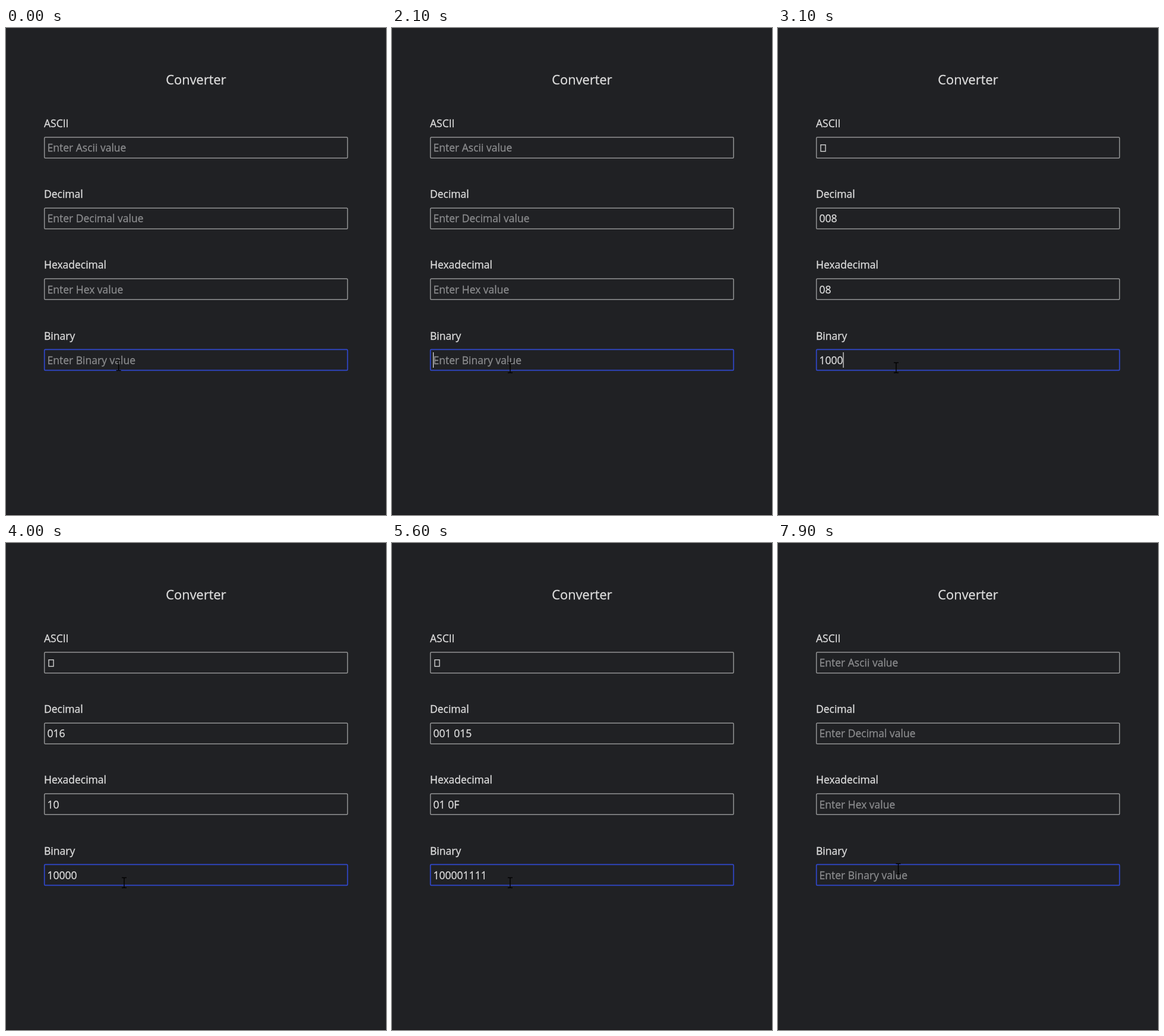
These frames come from a looping animation (640 by 820 pixels, 8000 ms). An HTML page:

```html
<!DOCTYPE html>
<html lang="en">
<head>
<meta charset="utf-8">
<title>Converter</title>
<style>
  html, body { margin: 0; width: 100%; height: 100%; overflow: hidden; background: #202124; }
  svg { display: block; width: 640px; height: 820px; }
  text {
    font: 17.5px "Open Sans", "Noto Sans CJK SC", "Noto Sans CJK JP", sans-serif;
    fill: #dedede; stroke: #dedede; stroke-width: 0.3; white-space: pre;
  }
  .title { font-size: 21.9px; text-anchor: middle; }
  .hint { fill: #8b8c8e; stroke: #8b8c8e; }
  .box { fill: none; stroke: #929394; stroke-width: 1.5; }
  .focus { stroke: #3048cc; stroke-width: 1.7; }
  .tofu { fill: none; stroke: #dedede; stroke-width: 1.3; }
  .mouse { fill: none; stroke: #000; stroke-width: 1.4; }
</style>
</head>
<body>
<svg id="stage" viewBox="0 0 640 820">
  <rect width="640" height="820" fill="#202124"/>
  <rect y="819" width="640" height="1" fill="#19171a"/>
  <text class="title" x="320" y="95">Converter</text>
</svg>
<script>
const LOOP = 8000;
const STEP = 119.1;
const TEXT_X = 69.6;
const DIGIT_W = 10.02;

// [time, binary input, caret visible]
const TYPING = [
  [0, "", 0], [500, "", 1], [1000, "", 0], [1100, "", 1], [2000, "", 0], [2100, "", 1],
  [2400, "1", 1], [2700, "10", 1], [2900, "100", 1], [3100, "1000", 1],
  [3500, "10000", 1], [4000, "10000", 0], [4400, "100001", 1], [4500, "1000011", 1],
  [4700, "10000111", 1], [5000, "100001111", 1], [5600, "100001111", 0],
  [6100, "100001111", 1], [6600, "100001111", 0], [7100, "100001111", 1],
  [7200, "", 1], [7900, "", 0]
];
// [time, x, y]
const MOUSE = [[0, 189.7, 568.2], [100, 199, 572], [7900, 202.6, 548.5]];

const stage = document.getElementById("stage");

function add(tag, attrs, content = "") {
  const el = document.createElementNS("http://www.w3.org/2000/svg", tag);
  for (const name in attrs) el.setAttribute(name, attrs[name]);
  el.textContent = content;
  return stage.appendChild(el);
}

const fields = [["ASCII", "Ascii"], ["Decimal", "Decimal"], ["Hexadecimal", "Hex"], ["Binary", "Binary"]]
  .map(([label, name], i) => {
    const y = i * STEP;
    add("text", { x: 64, y: 167.2 + y }, label);
    add("rect", {
      class: i === 3 ? "box focus" : "box",
      x: 64.7, y: 184.1 + y, width: 510.6, height: 35, rx: 1.5
    });
    return { el: add("text", { x: TEXT_X, y: 208.3 + y }), hint: `Enter ${name} value` };
  });

const tofu = add("rect", { class: "tofu", x: 72, y: 196.7, width: 8, height: 11 });
const caret = add("rect", { y: 546, width: 1.2, height: 26, fill: "#e4e4e4" });
const mouse = add("path", { class: "mouse", d: "M-4 -8.5H-1L0 -8L1 -8.5H4M0 -8V8M-4 8.5H-1L0 8L1 8.5H4" });

function current(track, t) {
  return track.filter(step => step[0] <= t).pop();
}

function toBytes(bits) {
  const padded = bits.padStart(Math.ceil(bits.length / 8) * 8, "0");
  return (padded.match(/.{8}/g) || []).map(b => parseInt(b, 2));
}

function toChar(code) {
  if (code < 32) return "";
  return code === 135 ? "秄" : String.fromCharCode(code);
}

function show(bits, caretOn) {
  const bytes = toBytes(bits);
  const values = [
    bytes.map(toChar).join(""),
    bytes.map(n => String(n).padStart(3, "0")).join(" "),
    bytes.map(n => n.toString(16).toUpperCase().padStart(2, "0")).join(" "),
    bits
  ];
  fields.forEach(({ el, hint }, i) => {
    el.textContent = bits ? values[i] : hint;
    el.setAttribute("class", bits ? "" : "hint");
  });
  // Control codes above 2 have no glyph and appear as an empty box.
  tofu.style.display = bytes.some(n => n > 2 && n < 32) ? "" : "none";
  caret.style.display = caretOn ? "" : "none";
  caret.setAttribute("x", 69 + bits.length * DIGIT_W + (bits ? 0.4 : 0));
}

let shown;
function frame() {
  const t = performance.now() % LOOP;
  const step = current(TYPING, t);
  if (step !== shown) {
    shown = step;
    show(step[1], step[2]);
  }
  const [, x, y] = current(MOUSE, t);
  mouse.setAttribute("transform", `translate(${x} ${y})`);
  requestAnimationFrame(frame);
}
frame();
</script>
</body>
</html>
```
